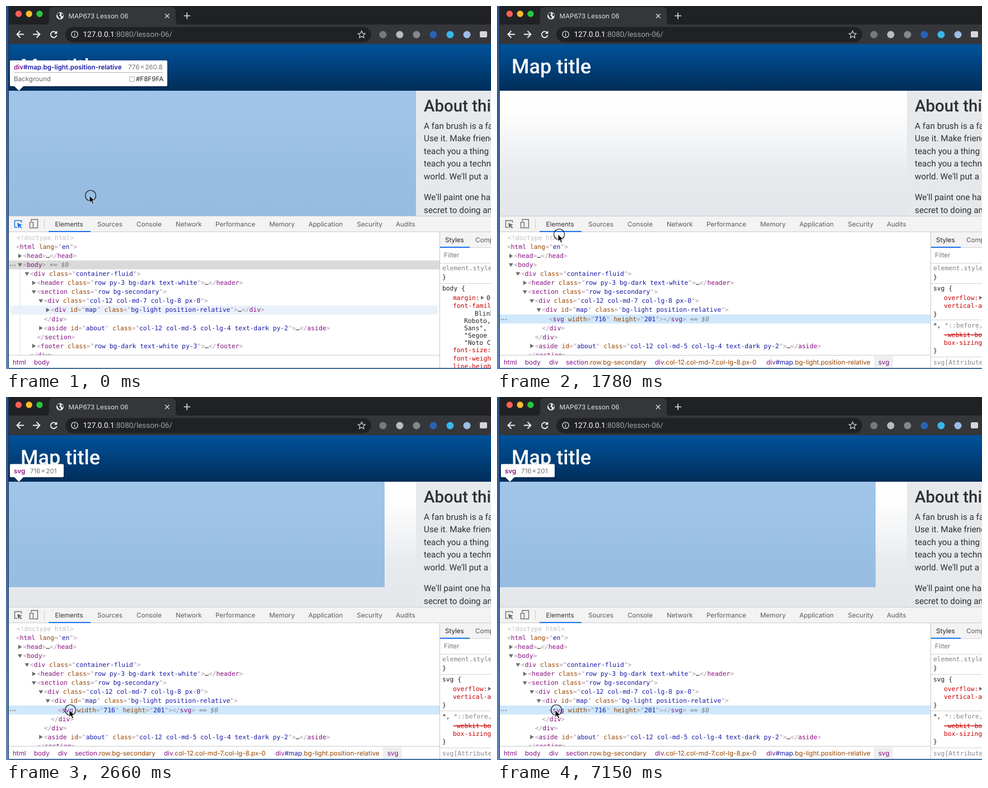
An HTML page that plays this animation: 866 by 647 pixels, repeating every 8 s.

```html
<!DOCTYPE html>
<html lang="en">
<head>
<meta charset="utf-8">
<title>Inspecting an element</title>
<style>
  html, body { margin: 0; width: 100%; height: 100%; overflow: hidden; background: #3c659c; }
  svg { display: block; width: 100%; height: 100%; }
  text { text-rendering: geometricPrecision; white-space: pre; }
  .ui { font: 11.6px Inter, sans-serif; }
  .page { font-family: Roboto, sans-serif; }
  .mono { font: 11.32px "DejaVu Sans Mono", monospace; }
</style>
</head>
<body>
<svg id="stage" viewBox="0 0 866 647"></svg>
<script>
const LOOP = 8000;
const TAG = '#881280', ATTR = '#994500', VALUE = '#1a1aa6', BRACKET = '#a894a6';
const RED = '#c80000', GREY = '#737373', INK = '#222';

// start ms, cursor x, cursor y, selected node, hovered tree row, highlighted node
const steps = [
  [0, 151, 338, 'body', 8, 'mapDetail'],
  [150, 183, 325, 'body', 9, 'svg'],
  [290, 196, 316, 'body', 9, 'svg'],
  [1040, 196, 315, 'svg'],
  [1490, 196, 314, 'svg'],
  [1630, 178, 316, 'svg'],
  [1780, 111, 407, 'svg'],
  [1920, 112.5, 549, 'svg', 6, 'section'],
  [2070, 118, 586, 'svg', 11, 'column'],
  [2220, 118, 577, 'svg', 10, 'map'],
  [2370, 119, 567, 'svg', 10, 'map'],
  [2510, 116, 562, 'svg', 10, 'map'],
  [2660, 115, 558, 'svg', 9, 'svg'],
  [4760, 96, 541, 'svg', 8, 'map'],
  [4910, 97, 540.5, 'svg', 8, 'map'],
  [6710, 97.5, 541.5, 'svg', 8, 'map'],
  [6860, 104, 553, 'svg', 9, 'svg'],
  [7000, 107, 559, 'svg', 9, 'svg'],
  [7150, 106, 558, 'svg', 9, 'svg'],
];

// name, classes, size, size label x, tooltip right edge, highlight right and bottom
const nodes = {
  map: ['div', '#map.bg-light.position-relative', '776 × 260.8', 218, 288, 732, 374],
  column: ['div', '.col-12.col-md-7.col-lg-8.px-0', '776 × 260.8', 218, 288, 732, 374],
  section: ['section', '.row.bg-secondary', '1164 × 260.8', 174, 251, 866, 374],
  svg: ['svg', '', '716 × 201', 43, 103, 676, 339],
};
nodes.mapDetail = nodes.map;

const esc = s => s.replace(/</g, '&lt;').replace(/>/g, '&gt;');
const span = (s, fill) => `<tspan fill="${fill}">${esc(s)}</tspan>`;
const text = (x, y, content, cls = 'ui', fill = INK, extra = '') =>
  `<text x="${x}" y="${y}" class="${cls}" fill="${fill}" ${extra}>${content}</text>`;
const rect = (x, y, w, h, fill, extra = '') =>
  `<rect x="${x}" y="${y}" width="${w}" height="${h}" fill="${fill}" ${extra}/>`;
const circle = (x, y, r, fill, extra = '') =>
  `<circle cx="${x}" cy="${y}" r="${r}" fill="${fill}" ${extra}/>`;
const line = (d, stroke, width = 1, extra = '') =>
  `<path d="${d}" fill="none" stroke="${stroke}" stroke-width="${width}" ${extra}/>`;
const shape = (d, fill, extra = '') => `<path d="${d}" fill="${fill}" ${extra}/>`;
const gradient = (id, ...stops) => `<linearGradient id="${id}" x2="0" y2="1">${
  stops.map(([at, color]) => `<stop offset="${at}" stop-color="${color}"/>`).join('')}</linearGradient>`;

const defs = `<defs>
  ${gradient('desktop', [0, '#284f87'], [1, '#5f88b8'])}
  ${gradient('header', [0, '#01529a'], [.45, '#00427e'], [1, '#002d59'])}
  ${gradient('map', [0, '#fff'], [.18, '#fdfdfd'], [.65, '#e8ebee'], [1, '#e3e6ea'])}
  <clipPath id="treeClip">${rect(5, 403, 769, 219)}</clipPath>
  <filter id="shadow" x="-10%" y="-30%" width="120%" height="170%">
    <feDropShadow dx="0" dy="1" stdDeviation="1.5" flood-opacity=".35"/></filter>
</defs>`;

function browser() {
  const lights = ['#ff5f57', '#febc2e', '#28c840'];
  const extensions = ['#777a7d', '#b9bbbd', '#85888b', '#2962b5', '#38b6ea', '#9dbce6'];
  return rect(0, 0, 866, 647, 'url(#desktop)') +
    rect(4, 0, 1, 645, '#1c3049') +
    rect(5, 0, 861, 34, '#202124') + rect(5, 33, 861, 35, '#35363a') +
    shape('M69 34Q77 34 77 26V10Q77 2 85 2H295Q303 2 303 10V26Q303 34 311 34Z', '#35363a') +
    lights.map((c, i) => circle(22.5 + 18.7 * i, 14, 5.7, c)).join('') +
    circle(96.5, 17.5, 6.5, '#f1f3f4') +
    shape('M91 14l4-2 2 2-2 3 3 2-1 4-3-2-2-4zM99 13l3 2v4l-3-2z', '#35363a') +
    text(111.5, 22, 'MAP673 Lesson 06', 'ui', '#e2e4e7') +
    line('M284 14l7.5 7.5m0-7.5l-7.5 7.5', '#d5d7da', 1.4) +
    line('M317.500 17.500h11.500M323.200 11.700v11.500', '#e1e3e6', 1.6) +
    line('M32 50.500H19.500m6-6l-6 6 6 6M48 50.500h12.500m-6-6l6 6-6 6', '#f1f3f4', 1.8) +
    line('M89.500 47.500A5.400 5.400 0 1 0 90.500 52', '#f1f3f4', 1.8) +
    shape('M91.300 44v5.500h-5.500z', '#f1f3f4') +
    rect(106, 37.5, 546, 27, '#202124', 'rx="13.500"') +
    circle(122.5, 50.5, 5.7, 'none', 'stroke="#dfe1e4" stroke-width="1.300"') +
    line('M122.500 49.500v4.200M122.500 46.700v1.500', '#dfe1e4', 1.4) +
    text(137.5, 55.3, span('127.0.0.1', '#fff') + span(':8080/lesson-06/', '#9fa3a8'), 'page', '#fff', 'font-size="13.500"') +
    line('M635 44.500l1.900 4.100 4.500.5-3.300 3 .9 4.500-4-2.300-4 2.300.9-4.500-3.300-3 4.500-.5z', '#d6d8db', 1.2) +
    extensions.map((c, i) => circle(673 + 30 * i, 51, 6.5, c)).join('') +
    rect(846, 45, 13, 11, '#d5d6d8', 'rx="2"');
}

function page() {
  const paragraph = ['A fan brush is a fantastic', "Use it. Make friends", 'teach you a thing or', 'teach you a technique',
    "world. We'll put a lit"];
  const copy = (s, y) => text(746, y, s, 'page', '#2d3135', 'font-size="15.300"');
  return rect(5, 68, 861, 83, 'url(#header)') +
    text(26, 119.5, 'Map title', 'page', '#fff', 'font-size="36" font-weight="500"') +
    rect(5, 151, 727, 223, 'url(#map)') + rect(732, 151, 134, 223, '#e6e9ec') +
    text(746, 187.5, 'About this map', 'page', '#2d3135', 'font-size="29.400" font-weight="500"') +
    paragraph.map((s, i) => copy(s, 218.5 + 22.5 * i)).join('') +
    copy("We'll paint one happy", 346) + copy('secret to doing any', 368.5);
}

function highlight(key) {
  if (!key) return '';
  const [name, classes, size, sizeX, right, areaRight, areaBottom] = nodes[key];
  const detail = key === 'mapDetail';
  const top = detail ? 97 : 119.5;
  const base = top + 16;
  return rect(5, 151, areaRight - 5, areaBottom - 151, 'rgba(111,168,220,.66)') +
    shape(`M9 ${top}H${right - 2}q2 0 2 2V141q0 2-2 2H31l-8 8-8-8H9q-2 0-2-2V${top + 2}q0-2 2-2z`, '#fff', 'filter="url(#shadow)"') +
    text(14, base, span(name, TAG) + span(classes, VALUE), 'ui', VALUE, 'style="font-weight:600"') +
    text(sizeX, base, size.replace(/ /g, '\u200a'), 'ui', GREY) +
    (detail ? line('M14 118.500H280', '#b5b5b5') + text(14, 134, 'Background', 'ui', '#666') +
      rect(220.5, 126, 8.5, 8.5, '#f8f9fa', 'stroke="#aaa"') + text(232, 134, '#F8F9FA') : '');
}

const markup = code => code.replace(/(\w+)="([^"]*)"|<\/?|>|\w+/g, (token, attr, value) =>
  attr ? span(attr, ATTR) + span('="', BRACKET) + span(value, VALUE) + span('"', BRACKET)
    : span(token, /[<>]/.test(token) ? BRACKET : TAG));

// depth, arrow (+ closed, - open), code
const treeStart = [
  [0, '', ''],
  [0, '', '<html lang="en">'],
  [1, '+', '<head>…</head>'],
  [1, '-', '<body>'],
  [2, '-', '<div class="container-fluid">'],
  [3, '+', '<header class="row py-3 bg-dark text-white">…</header>'],
  [3, '-', '<section class="row bg-secondary">'],
  [4, '-', '<div class="col-12 col-md-7 col-lg-8 px-0">'],
];
const mapTag = '<div id="map" class="bg-light position-relative">';
const closedMap = [[5, '+', mapTag + '…</div>']];
const openMap = [
  [5, '-', mapTag],
  [6, '', '<svg width="716" height="201"></svg>'],
  [5, '', '</div>'],
];
const treeEnd = [
  [4, '', '</div>'],
  [4, '+', '<aside id="about" class="col-12 col-md-5 col-lg-4 text-dark py-2">…</aside>'],
  [3, '', '</section>'],
  [3, '+', '<footer class="row bg-dark text-white py-3">…</footer>'],
  [2, '', '</div>'],
];

function tree(selected, hoverRow, key) {
  const rows = [...treeStart, ...(key === 'mapDetail' ? closedMap : openMap), ...treeEnd];
  const bodySelected = selected === 'body';
  const selectedRow = bodySelected ? 3 : 9;
  const mid = i => 413.3 + 16.06 * i;
  let out = rect(5, mid(selectedRow) - 8, 769, 16, bodySelected ? '#dadada' : '#cfe8fc');
  if (bodySelected) out += line('M25 470V622', '#c6dcf5');
  if (hoverRow && hoverRow !== selectedRow) out += rect(8, mid(hoverRow) - 8, 763, 16, '#ebf1fb', 'rx="4"');
  out += text(19, mid(0) + 3.7, '&lt;!doctype html&gt;', 'mono', '#c0c0c0');
  rows.forEach(([depth, arrow, code], i) => {
    const x = 18 + 12.43 * depth, y = mid(i);
    const suffix = i === selectedRow ? `<tspan fill="#777"> == <tspan font-style="italic">$0</tspan></tspan>` : '';
    if (arrow === '+') out += shape(`M${x - 8.5} ${y - 4}l6.500 4-6.500 4z`, '#6e6e6e');
    if (arrow === '-') out += shape(`M${x - 9.5} ${y - 3}h8l-4 6.500z`, '#6e6e6e');
    out += text(x, y + 3.7, markup(code) + suffix, 'mono');
  });
  [8, 12, 16].forEach(x => out += circle(x, mid(selectedRow) + .8, 1, '#777'));
  return `<g clip-path="url(#treeClip)">${out}</g>`;
}

function crumbs(selected) {
  const items = [[12, 'html'], [50, 'body']];
  if (selected === 'svg') items.push([93, 'div'], [123, 'section', '.row.bg-secondary'],
    [282, 'div', '.col-12.col-md-7.col-lg-8.px-0'], [481, 'div', '.bg-light.position-relative', '#map'], [681, 'svg']);
  return rect(5, 622, 769, 23, '#fff') + line('M5 622.500H774', '#ccc') +
    (selected === 'svg' ? rect(673, 624, 34, 20, '#eceef0') : '') +
    items.map(([x, name, classes = '', id = '']) =>
      text(x, 638.5, span(name, TAG) + span(id, VALUE) + span(classes, ATTR))).join('');
}

function styles(selected) {
  const code = (x, mid, s, fill = INK, extra = '') => text(x, mid + 3.7, s, 'mono', fill, extra);
  const prop = (mid, s, extra) => code(798, mid, s, RED, extra);
  const rule = y => line(`M775 ${y}H866`, '#d4d4d4');
  const arrow = (x, y) => shape(`M${x} ${y - 3.5}l5.500 3.500-5.500 3.500z`, '#6e6e6e');
  const shared = rect(774, 403, 92, 242, '#fff') + rect(775, 403, 91, 28, '#f3f3f3') +
    line('M774.500 403V645', '#c4c4c4') + rule(430.5) + rect(775, 429, 53, 2, '#1a73e8') +
    text(784, 421, 'Styles') + text(838, 421, 'Computed', 'ui', '#5a5a5a') +
    text(782, 448, 'Filter', 'ui', '#757575') + rule(458.5) +
    code(779, 467, 'element.style {', '#808080') + code(779, 483, '}') + rule(494.5);
  if (selected === 'body') {
    const fonts = ['Roboto,', 'Sans",', '"Segoe UI', '"Noto Color'];
    return shared + code(779, 503, 'body {') + prop(520, 'margin:') + arrow(848, 520) + code(858, 520, '0;') +
      prop(534, 'font-family:') + code(837, 548, 'BlinkMac') +
      fonts.map((s, i) => code(818, 561 + 13 * i, s)).join('') +
      prop(613, 'font-size:') + prop(628, 'font-weight:') +
      `<g clip-path="inset(0)">${prop(642, 'line-height:')}</g>`;
  }
  return shared + code(779, 503, 'svg {') + prop(520, 'overflow:') + arrow(861, 520) +
    prop(534, 'vertical-align:') + code(779, 549, '}') + rule(559.5) +
    code(779, 569, '*, ' + span('*::before,', '#888')) +
    prop(586, '-webkit-box', 'text-decoration="line-through"') + prop(600, 'box-sizing:') +
    code(779, 614, '}') + rule(625.5) + code(779, 635, 'svg[Attributes', '#888', 'font-style="italic"');
}

function devtools(selected, hoverRow, key) {
  const tabs = { Elements: 87.5, Sources: 163, Console: 233, Network: 303, Performance: 374,
    Memory: 470, Application: 540, Security: 626.5, Audits: 696 };
  const picker = selected === 'body' ? '#1a73e8' : '#6e6e6e';
  return rect(5, 374, 861, 271, '#fff') + rect(5, 374, 861, 29, '#f3f3f3') +
    line('M5 374.500H866M5 402.500H866', '#cbcbcb') +
    line('M20 394.500H15.500V382.500H27.500V386', picker, 1.4) +
    shape('M20 386.500l9 3.500-3.800 1.500 3.300 3.500-1.500 1.400-3.300-3.500-1.700 3.800z', picker) +
    line('M45 384V380.500H56.500V395.500H50', '#6e6e6e', 1.4) +
    rect(42.5, 385.5, 6, 10, '#f3f3f3', 'stroke="#6e6e6e" stroke-width="1.400"') +
    line('M68.500 380V397', '#ccc') +
    Object.entries(tabs).map(([name, x]) => text(x, 393, name, 'ui', x < 100 ? '#333' : '#5a5a5a')).join('') +
    rect(76, 401, 75, 2, '#1a73e8') +
    tree(selected, hoverRow, key) + crumbs(selected) + styles(selected) +
    rect(5, 645, 861, 2, 'url(#desktop)');
}

const cursor = (x, y) => `<g transform="translate(${x} ${y})">
  ${circle(0, 0, 9.5, 'none', 'stroke="#111" stroke-width="1.200"')}
  ${shape('M-2 0V12.500L1 9.800 3.200 14.700 5.500 13.700 3.300 9H7.300Z', '#000', 'stroke="#fff" stroke-width=".8"')}</g>`;

const stage = document.getElementById('stage');
const backdrop = defs + browser() + page();
let shown;

function frame(now) {
  const time = now % LOOP;
  const step = steps.findLast(([start]) => start <= time);
  if (step !== shown) {
    const [, x, y, selected, hoverRow, key] = shown = step;
    stage.innerHTML = backdrop + highlight(key) + devtools(selected, hoverRow, key) + cursor(x, y);
  }
  requestAnimationFrame(frame);
}
const begin = performance.now();
const tick = now => frame(Math.max(0, now));
tick(performance.now() - begin);
</script>
</body>
</html>
```
